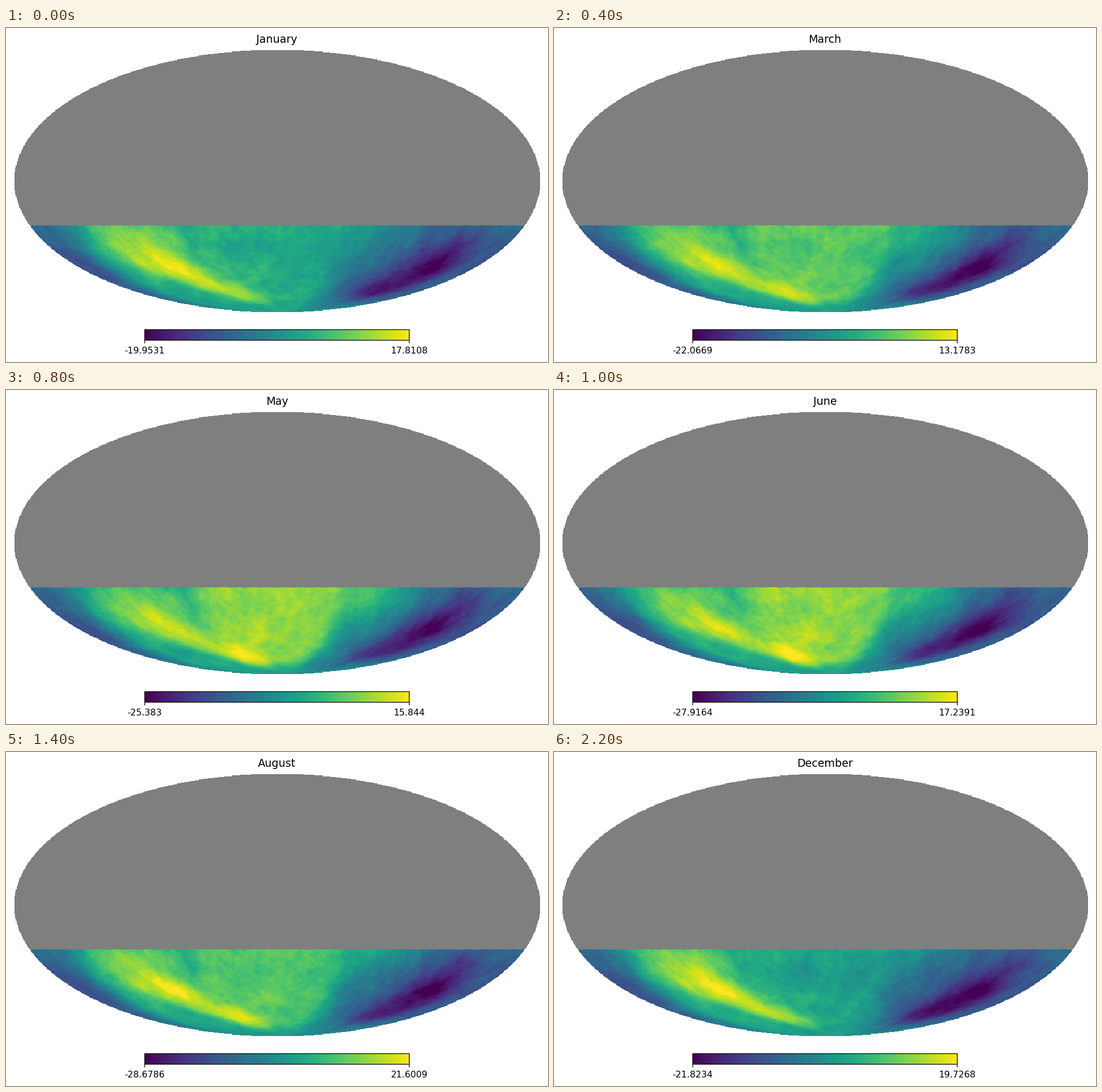
A matplotlib script for the animation above (2.4 s loop, 953 by 588 pixels).

```python
import numpy as np
import matplotlib.pyplot as plt
from matplotlib.animation import FuncAnimation
from matplotlib.patches import Rectangle

W, H, DPI = 953, 588, 128
PX = 72 / DPI
CX, CY, R = 476.5, 269.4, 231.4
BAR_L, BAR_R, BAR_T, BAR_B = 243.9, 709.1, 531, 549.7
NSIDE = 128

MONTHS = ["January", "February", "March", "April", "May", "June", "July",
          "August", "September", "October", "November", "December"]
LOW = [-19.9531, -20.9127, -22.0669, -23.8415, -25.383, -27.9164,
       -30.1996, -28.6786, -27.9352, -27.0581, -24.4718, -21.8234]
HIGH = [17.8108, 15.2946, 13.1783, 14.4762, 15.844, 17.2391,
        18.5439, 21.6009, 22.3184, 22.9419, 21.3547, 19.7268]

# Mollweide grid
gx, gy = np.meshgrid(np.linspace(-2, 2, 800), np.linspace(1, -1, 400))
globe = gx ** 2 / 4 + gy ** 2 < 1
theta = np.arcsin(gy)
z = (2 * theta + np.sin(2 * theta)) / np.pi
lon = gx / 2 / np.maximum(np.cos(theta), 1e-6)
teeth = 4 * np.abs(lon * 2 * NSIDE % 1 - 0.5) - 1
south = globe & (z < -0.4226 + teeth * 2 / 3 / NSIDE)

# Visible cap: u is longitude in half turns, v is height on the stage
u, v, sz = lon[south], CY - R * gy[south], z[south]
ring = np.sqrt(1 - sz ** 2)
ball = np.stack([ring * np.cos(np.pi * u), ring * np.sin(np.pi * u), sz], 1)


def bell(d, width):
    return np.exp(-0.5 * (d / width) ** 2)


def step(d, width):
    return 1 / (1 + np.exp(-d / width))


def spot(a, b, wa, wb):
    return bell((u - a + 1) % 2 - 1, wa) * bell(v - b, wb)


def ripple(seed, count):
    """Fractal texture: random plane waves through the sphere."""
    rng = np.random.default_rng(seed)
    out = np.zeros(len(u))
    for k in np.geomspace(12, 260, count):
        d = rng.normal(size=3)
        d *= k / np.linalg.norm(d)
        out += k ** -0.5 * np.cos(ball @ d + rng.uniform(0, 2 * np.pi))
    return out / out.std()


# Fixed features
plateau = 0.34 + 0.25 * (step(u + 0.83, 0.03) - step(u - 0.32, 0.07))
crest = -0.6 + 0.3 * ((v - 350) / 120) ** 3
ridge = bell(u - crest, 0.12) * bell(v - 418, 60)
swell = step(u + 0.33, 0.04) * step(0.26 - u, 0.03)
hollow = spot(0, 385, 0.12, 30)
glow = spot(0.42, 345, 0.12, 35)
flank = spot(0.42, 400, 0.12, 40)
trough = spot(0.76, 418, 0.11, 36)
tail = spot(0.66, 463, 0.13, 18)
corner = spot(-0.95, 415, 0.06, 30)
pole = bell(v - 502, 14)
grain = ripple(7, 90)
viridis = plt.get_cmap("viridis")


def wave(m, peak):
    return np.cos(2 * np.pi * (m - peak) / 12)


def picture(m):
    s = (1 + wave(m, 4.4)) / 2
    f = plateau + (0.38 - 0.06 * s) * ridge + 0.26 * s * swell
    f += (0.1 + 0.13 * s) * glow + 0.1 * wave(m, 3.5) * flank
    f -= 0.05 * (1 - s) * hollow + 0.32 * trough + 0.08 * corner
    f -= (0.2 - 0.08 * s) * tail
    f += (0.55 - f) * pole
    f += 0.022 * grain + 0.014 * ripple(100 + m, 60)
    img = np.ones((400, 800, 4))
    img[globe] = (0.5, 0.5, 0.5, 1)
    img[south] = viridis(np.clip(f, 0, 1))
    return img


fig = plt.figure(figsize=(W / DPI, H / DPI), dpi=DPI, facecolor="white")
ax = fig.add_axes([0, 0, 1, 1])
ax.axis("off")


def show(img, left, right, bottom, top):
    return ax.imshow(img, extent=(left, right, bottom, top), cmap=viridis,
                     interpolation="nearest", aspect="auto")


sky = show(picture(0), CX - 2 * R, CX + 2 * R, CY + R, CY - R)
show(np.linspace(0, 1, 256)[None], BAR_L, BAR_R, BAR_B, BAR_T)
line = dict(color="black", lw=1.25 * PX, snap=False)
ax.add_patch(Rectangle((BAR_L, BAR_T), BAR_R - BAR_L, BAR_B - BAR_T,
                       fill=False, **line))
for x in (BAR_L, BAR_R):
    ax.plot([x, x], [BAR_B, BAR_B + 5.5], solid_capstyle="butt", **line)
ax.set(xlim=(0, W), ylim=(H, 0))


def label(x, y, size):
    return ax.text(x, y, "", ha="center", va="baseline",
                   family="DejaVu Sans", fontsize=size * PX)


title = label(CX, 26.2, 19)
low, high = label(BAR_L, 573, 15.83), label(BAR_R, 573, 15.83)


def draw(m):
    sky.set_data(picture(m))
    title.set_text(MONTHS[m])
    low.set_text(f"{LOW[m]:g}")
    high.set_text(f"{HIGH[m]:g}")
    return sky, title, low, high


anim = FuncAnimation(fig, draw, frames=12, interval=200, repeat=True,
                     repeat_delay=0)
plt.show()
```
